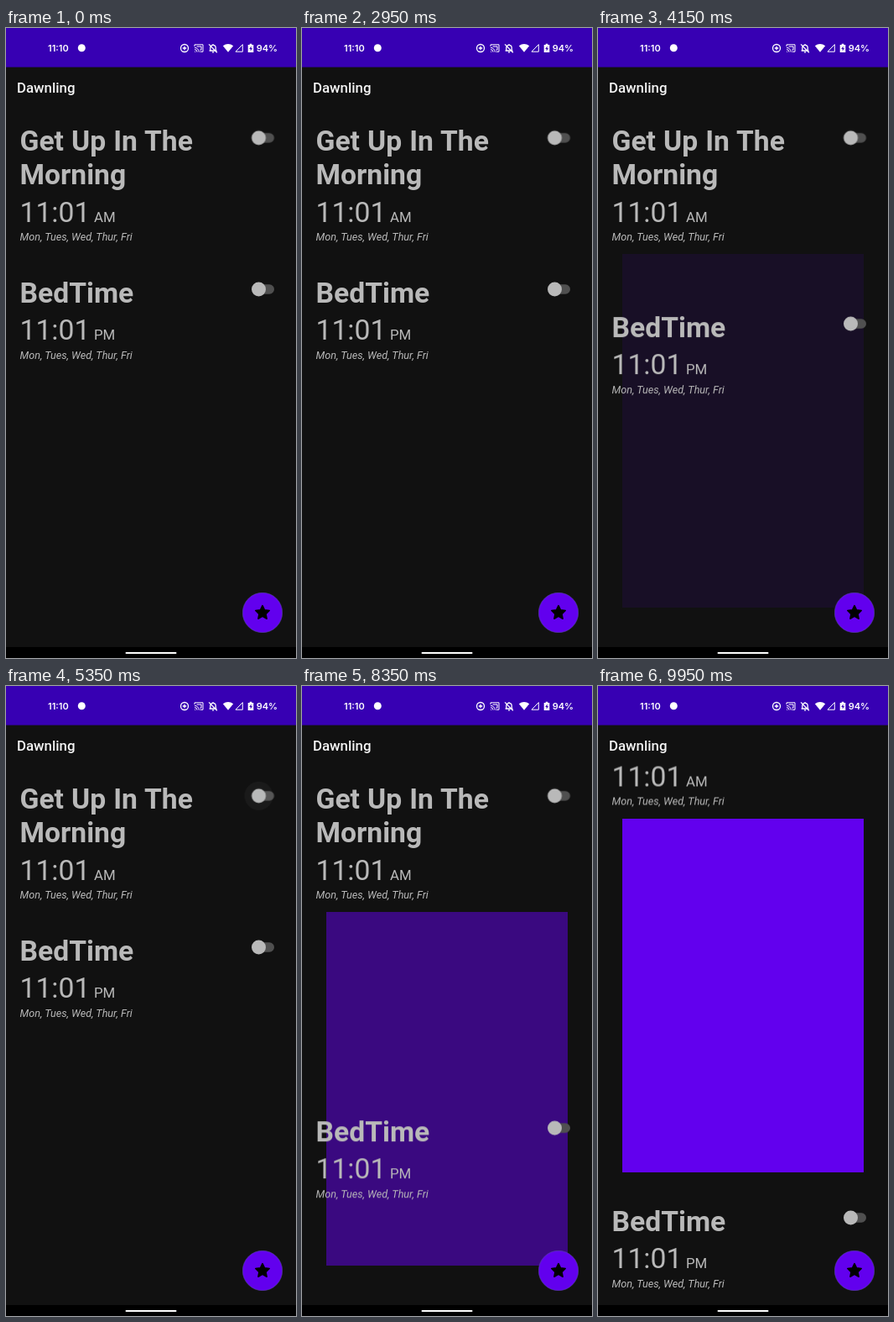
An HTML page that plays this animation: 346x750 px, repeating every 10000 ms.

```html
<!DOCTYPE html>
<html lang="en">
<head>
<meta charset="utf-8">
<title>Alarm list</title>
<style>
  html, body { margin: 0; width: 100%; height: 100%; overflow: hidden; background: #111; }
  svg { display: block; width: 346px; height: 750px; font-family: Roboto, sans-serif; }

  .list { fill: #b9b9b9; }
  .name { font-size: 33.67px; font-weight: 700; word-spacing: .7px; }
  .time { font-size: 33.67px; }
  .half { font-size: 16.84px; }
  .days { font-size: 12.63px; font-style: italic; }
  .title { font-size: 16.84px; font-weight: 500; fill: #f4f4f4; }
  .status { font: 600 11px Inter, sans-serif; fill: #fff; }
  .line { fill: none; stroke: #fff; stroke-width: 1.3; }
  .thin { stroke-width: 1; }
  .track { fill: #505050; }
  .thumb { fill: #b9b9b9; }

  .list, .panel, .next, .live * { animation: 10s linear infinite; }
  .list { animation-name: scroll; }
  .panel, .next { animation-timing-function: cubic-bezier(.24, .62, .08, 1); }
  .panel { animation-name: fade; }
  .next { animation-name: push; }
  .live .knob { animation-name: slide; animation-timing-function: ease-in-out; }
  .live .thumb { animation-name: thumb; }
  .live .track { animation-name: track; }
  .live .ripple { animation-name: ripple; }
  .ripple { fill: #fff; opacity: 0; }

  @keyframes scroll {
    0%, 94% { transform: translateY(0); animation-timing-function: cubic-bezier(.35, .1, .45, 1); }
    99.4%, 100% { transform: translateY(-111.5px); }
  }
  @keyframes fade {
    0%, 29.6%, 43.5%, 83% { opacity: 0; }
    33%, 40%, 86.4%, 100% { opacity: 1; }
  }
  @keyframes push {
    0%, 29.6%, 43.5%, 83% { transform: translateY(0); }
    33%, 40%, 86.4%, 100% { transform: translateY(433.5px); }
  }
  @keyframes slide {
    0%, 53.5%, 77%, 100% { transform: translateX(0); }
    56%, 74.5% { transform: translateX(16.3px); }
  }
  @keyframes thumb {
    0%, 53.5%, 76%, 100% { fill: #b9b9b9; }
    55%, 74.5% { fill: #03dac5; }
  }
  @keyframes track {
    0%, 53.5%, 76%, 100% { fill: #505050; }
    55%, 74.5% { fill: #0d4f49; }
  }
  @keyframes ripple {
    0%, 53%, 58%, 76%, 79.5%, 100% { opacity: 0; }
    55%, 56%, 77%, 77.5% { opacity: .16; }
  }
</style>
</head>
<body>
<svg viewBox="0 0 346 750">
  <defs>
    <clipPath id="view"><path d="M0 93H346V737H0Z"/></clipPath>
  </defs>

  <rect width="346" height="750" fill="#111"/>

  <g clip-path="url(#view)">
    <g class="list">
      <rect class="panel" x="29" y="269" width="288" height="421" fill="#6200ee"/>

      <text class="name" x="16.5" y="146">Get Up In The</text>
      <text class="name" x="16.5" y="185.5">Morning</text>
      <text class="time" x="16.5" y="230.5">11:01</text>
      <text class="half" x="105" y="230.5">AM</text>
      <text class="days" x="16.5" y="253">Mon, Tues, Wed, Thur, Fri</text>
      <g class="live" transform="translate(301.5 130.8)">
        <rect class="track" x="-2" y="-5.8" width="20.5" height="11.6" rx="5.8"/>
        <g class="knob">
          <circle class="ripple" r="17"/>
          <circle class="thumb" r="8.5"/>
        </g>
      </g>

      <g class="next">
        <text class="name" x="16.5" y="326.5">BedTime</text>
        <text class="time" x="16.5" y="371.3">11:01</text>
        <text class="half" x="105" y="371.3">PM</text>
        <text class="days" x="16.5" y="394">Mon, Tues, Wed, Thur, Fri</text>
        <g transform="translate(301.5 311)">
          <rect class="track" x="-2" y="-5.8" width="20.5" height="11.6" rx="5.8"/>
          <circle class="thumb" r="8.5"/>
        </g>
      </g>
    </g>
  </g>

  <text class="title" x="13" y="76.5">Dawnling</text>

  <!-- status bar -->
  <rect width="346" height="46.6" fill="#3700b3"/>
  <text class="status" x="50" y="27.7">11:10</text>
  <circle cx="90.3" cy="23.7" r="4.5" fill="#fff"/>
  <g class="line" transform="translate(213 24)">
    <circle r="4.5"/>
    <path d="M-2.2 0H2.2M0-2.2V2.2"/>
  </g>
  <path class="line thin" transform="translate(230 24)"
    d="M-5-2V-4.2H5V4.2H1.5M-5 3.8A1 1 0 0 1-4.2 4.6M-5 1.6A3 3 0 0 1-2 4.6M-5-.6A5.2 5.2 0 0 1 .2 4.6M-2.5-2H3V2H1.5"/>
  <path class="line" transform="translate(247 24)"
    d="M-3.2 2.7V-.5A3.2 3.2 0 0 1 3.2-.5V2.7M-4.4 3H4.4M0-5V-3.5M-1 4.8H1M-5-4.6L4.8 5.2"/>
  <path fill="#fff" d="M258.8 21.3Q265 16.5 271.2 21.3L265 28.8Z"/>
  <path class="line thin" d="M274 28.2H282.3V19.6Z"/>
  <path fill="#fff" d="M288.7 20H290.7V18.7H293.3V20H295.3V29H288.7Z"/>
  <path fill="#3700b3" d="M292.6 21.4L290.2 25H291.7V27.6L294 24H292.6Z"/>
  <text class="status" x="298.7" y="27.7">94%</text>

  <!-- action button -->
  <g transform="translate(306 696)">
    <circle r="23.7" fill="#6200ee" stroke="#5a48a4" stroke-width=".6"/>
    <path stroke="#000" stroke-width="1.6" stroke-linejoin="round"
      d="M0-8.4L2.5-3.1L8.2-2.5L4 1.6L5.1 7.2L0 4.4L-5.1 7.2L-4 1.6L-8.2-2.5L-2.5-3.1Z"/>
  </g>

  <!-- navigation bar -->
  <rect y="737" width="346" height="13" fill="#000"/>
  <rect x="142.5" y="743" width="61" height="2" rx="1" fill="#fff"/>
</svg>
</body>
</html>
```
